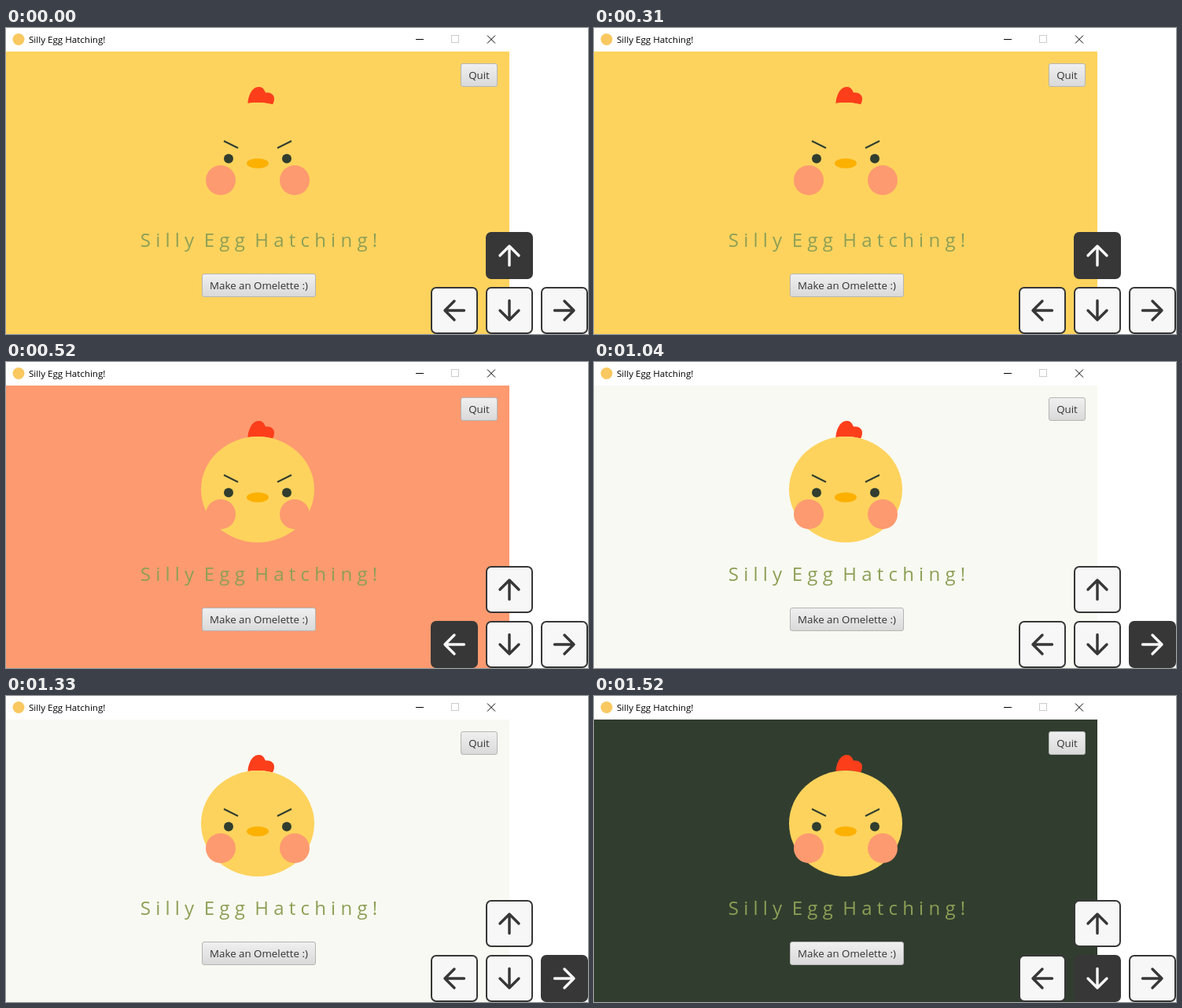
Recreate the animation shown at these times as an HTML page. Size 740x390 px, loop 2000 ms.

```html
<!DOCTYPE html>
<html lang="en">
<head>
<meta charset="utf-8">
<title>Silly Egg Hatching!</title>
<style>
  html, body { margin: 0; width: 100%; height: 100%; overflow: hidden; background: #fff; }
  svg { display: block; }
  text { font-family: "Open Sans", "Noto Sans", sans-serif; white-space: pre; }
  .button rect { fill: url(#face); stroke: #b5b5b5; }
  .button text { font-size: 13.3px; fill: #333; text-anchor: middle; }
  .key { --ink: #373737; --face: #f7f7f7; }
  .key.down { --ink: #f7f7f7; --face: #373737; }
  .key rect { fill: var(--face); stroke: #373737; stroke-width: 2; }
  .key path { fill: none; stroke: var(--ink); stroke-width: 3.4; stroke-linecap: round; stroke-linejoin: round; }
</style>
</head>
<body>
<svg width="740" height="390" viewBox="0 0 740 390">
  <defs>
    <linearGradient id="face" x2="0" y2="1">
      <stop stop-color="#f0f0f0"/><stop offset="1" stop-color="#d9d9d9"/>
    </linearGradient>
  </defs>

  <!-- title bar -->
  <circle cx="16" cy="14.5" r="7.5" fill="#f9c860"/>
  <text x="29" y="19" font-size="11.6">Silly Egg Hatching!</text>
  <g fill="none" stroke="#000">
    <path d="M521 14.5h10"/>
    <rect x="566.5" y="9.5" width="9" height="9" stroke="#ccc"/>
    <path d="M612 9.5l10 10m0-10l-10 10"/>
  </g>

  <rect id="backdrop" y="30" width="640" height="360"/>

  <!-- chick -->
  <path fill="#fc3e1b" d="M307.5 96C308 86 313 75 321.5 75C326 75 328.500 78.500 330 82.500C336 81.500 341 85 341 90C341 93 340 95.500 339 97.500Q323 93.500 307.500 96Z"/>
  <ellipse cx="320" cy="162.5" rx="72" ry="67.500" fill="#fed35d"/>
  <g fill="#fd9a70"><circle cx="273" cy="194" r="19"/><circle cx="367" cy="194" r="19"/></g>
  <g fill="#313e2f"><circle cx="283" cy="166.500" r="6"/><circle cx="357" cy="166.500" r="6"/></g>
  <path d="M277 144l18 9M363 144l-18 9" stroke="#313e2f" stroke-width="2"/>
  <ellipse cx="320" cy="172.500" rx="14" ry="6.300" fill="#fcb000"/>

  <text x="321.500" y="279" font-size="24" text-anchor="middle" fill="#8d9f56">S i l l y  E g g  H a t c h i n g !</text>

  <g class="button">
    <rect x="578.5" y="45.500" width="46" height="29" rx="2.500"/>
    <text x="601.500" y="65">Quit</text>
  </g>
  <g class="button">
    <rect x="249.500" y="313.500" width="144" height="29" rx="2.500"/>
    <text x="321.500" y="333">Make an Omelette :)</text>
  </g>

  <g id="keys"></g>
</svg>
<script>
  // Key centre, arrow angle, and the backdrop shown while it is pressed
  const keys = [
    { x: 640, y: 290, angle: 0, color: '#fed35d', until: 520 },
    { x: 570, y: 360, angle: -90, color: '#fd9a70', until: 1040 },
    { x: 710, y: 360, angle: 90, color: '#f8f9f2', until: 1520 },
    { x: 640, y: 360, angle: 180, color: '#313e2f', until: 2000 },
  ];
  const backdrop = document.getElementById('backdrop');
  const keyGroup = document.getElementById('keys');

  keyGroup.innerHTML = keys.map(({ x, y, angle }) => `
    <g class="key" transform="translate(${x} ${y})">
      <rect x="-29" y="-29" width="58" height="58" rx="6"/>
      <path d="M0 12.5V-12M-12 0L0 -12L12 0" transform="rotate(${angle})"/>
    </g>`).join('');

  function draw() {
    const time = performance.now() % 2000;
    const active = keys.findIndex(key => time < key.until);
    backdrop.setAttribute('fill', keys[active].color);
    [...keyGroup.children].forEach((key, i) => key.classList.toggle('down', i === active));
    requestAnimationFrame(draw);
  }
  draw();
</script>
</body>
</html>
```
